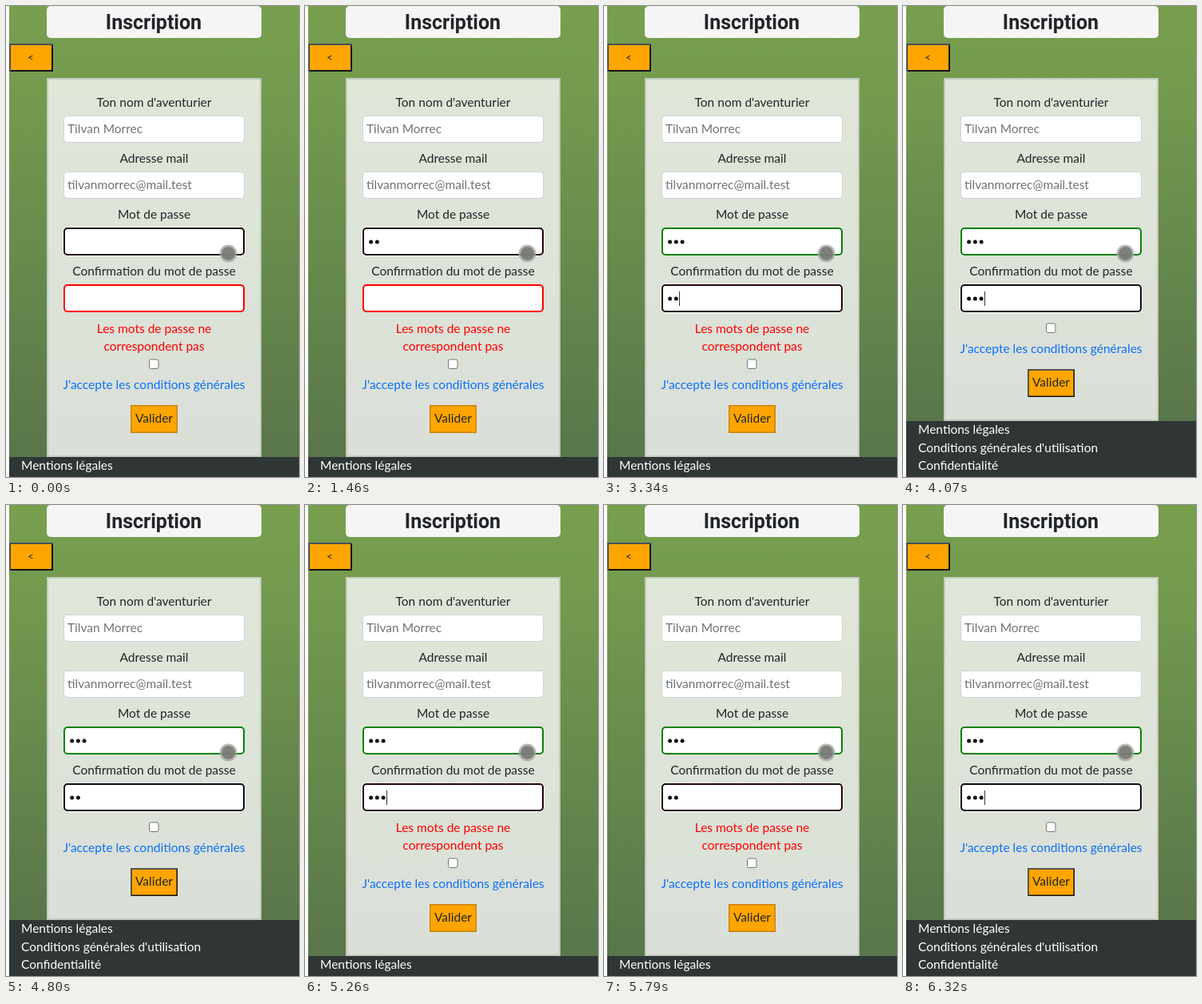
Recreate the animation shown at these times as an HTML page. Size 367 by 589 pixels, loop 6.72 s.

```html
<!DOCTYPE html>
<html lang="fr">
<head>
<meta charset="utf-8">
<title>Inscription</title>
<style>
  html, body { margin: 0; width: 100%; height: 100%; overflow: hidden; background: #fff; }
  svg { display: block; width: 367px; height: 589px; }
  text { font: 15.5px Lato, sans-serif; fill: #212529; }
  .mid { text-anchor: middle; }
  .title { font: 700 25px Roboto, sans-serif; }
  .hint { fill: #6f7377; }
  .error { fill: #f00; }
  .link { fill: #0d6efd; }
  .foot { fill: #fff; }
  .box { fill: #fff; stroke: #ced4da; }
  .button { fill: #ffa500; stroke: #111; }
  .bevel { fill: none; stroke: #4b5157; }
</style>
</head>
<body>
<svg viewBox="0 0 367 589">
  <defs>
    <linearGradient id="grass" x2="0" y2="1">
      <stop offset="0" stop-color="#789f4e"/>
      <stop offset=".2" stop-color="#749a4e"/>
      <stop offset="1" stop-color="#59764b"/>
    </linearGradient>
  </defs>
  <rect id="back" x="4" width="363" height="564" fill="url(#grass)"/>
  <rect x="51" width="269" height="40" rx="5" fill="#f5f5f5"/>
  <text class="mid title" x="185" y="29">Inscription</text>

  <rect class="button" x="5" y="48" width="53" height="33" stroke-width="2"/>
  <path class="bevel" d="M5 82V48H59" stroke-width="2"/>
  <text class="mid" x="31" y="69" style="font-size:13.5px">&lt;</text>

  <rect id="card" x="52" y="91" width="267" height="472" fill="#fafafc" fill-opacity=".8" stroke="#c3cabf" stroke-width="2"/>
  <g id="form"></g>
  <g id="error"></g>
  <g id="lower">
    <rect x="179.5" y="442" width="11.5" height="11.5" rx="2" fill="#fff" stroke="#767676"/>
    <rect id="button" class="button" x="156.75" y="499.75" width="57.5" height="33.5" stroke-width="1.5"/>
    <path id="bevel" class="bevel" d="M156.75 534V499.75H215" stroke-width="1.5"/>
    <rect x="4" y="564" width="363" height="80" fill="#2f3635"/>
  </g>
  <g fill-opacity=".8">
    <circle cx="278.5" cy="309.5" r="11" fill="#a5a7a2"/>
    <circle cx="278.5" cy="309.5" r="8.5" fill="#70726e"/>
  </g>
</svg>
<script>
const LOOP = 6720;
const PITCH = 7.75;
const $ = id => document.getElementById(id);

function add(parent, tag, attrs) {
  const el = document.createElementNS('http://www.w3.org/2000/svg', tag);
  for (const key in attrs) el.setAttribute(key, attrs[key]);
  return parent.appendChild(el);
}

function write(parent, style, y, text) {
  const x = style === 'hint' ? 77 : style === 'foot' ? 19 : 185.5;
  add(parent, 'text', { class: style, x, y }).textContent = text;
}

const show = (el, on) => el.setAttribute('visibility', on ? 'visible' : 'hidden');

function makeField(y) {
  const form = $('form');
  const halo = add(form, 'rect', { x: 71.5, y: y - .5, width: 228, height: 36, rx: 6, fill: 'none', stroke: '#fff' });
  const frame = add(form, 'rect', { x: 73, y: y + 1, width: 225, height: 33, rx: 4, fill: '#fff', 'stroke-width': 2 });
  const dots = [0, 1, 2].map(i =>
    add(form, 'circle', { cx: 82.6 + i * PITCH, cy: y + 18, r: 2.5, fill: '#111' }));
  const caret = add(form, 'rect', { y: y + 9, width: 1, height: 18, fill: '#333' });
  return (count, focus, valid, blink) => {
    const plain = valid ? '#0a800a' : '#f00';
    const dark = valid ? '#0c0c0c' : '#1e0505';
    frame.setAttribute('stroke', focus ? dark : plain);
    show(halo, focus);
    dots.forEach((dot, i) => show(dot, i < count));
    caret.setAttribute('x', Math.round(78.6 + count * PITCH));
    show(caret, focus && blink);
  };
}

['Ton nom d\'aventurier', 'Adresse mail', 'Mot de passe'].forEach((label, i) =>
  write($('form'), 'mid', 126 + 70 * i, label));
['Tilvan Morrec', 'tilvanmorrec@mail.test'].forEach((hint, i) => {
  add($('form'), 'rect', { class: 'box', x: 72.5, y: 137.5 + 70 * i, width: 226, height: 33, rx: 4.5 });
  write($('form'), 'hint', 159 + 70 * i, hint);
});
write($('form'), 'mid', 337, 'Confirmation du mot de passe');
write($('error'), 'mid error', 409, 'Les mots de passe ne');
write($('error'), 'mid error', 431, 'correspondent pas');
write($('lower'), 'mid link', 479, 'J\'accepte les conditions générales');
write($('lower'), 'mid', 521, 'Valider');
['Mentions légales', 'Conditions générales d\'utilisation', 'Confidentialité'].forEach((line, i) =>
  write($('lower'), 'foot', 580 + 22.5 * i, line));

const fields = [makeField(277), makeField(348)];

const actions = {
  blink(s) { s.caret = !s.caret; },
  type(s) { s.counts[s.focus]++; s.caret = true; },
  erase(s) { s.counts[s.focus]--; },
  accept(s) { s.valid[0] = true; },
  next(s) { s.focus = 1; s.caret = true; },
  check(s) { s.valid[1] = s.counts[0] === s.counts[1]; }
};

const events = [
  [70, 'blink'], [600, 'type'], [930, 'type'], [1460, 'blink'],
  [1530, 'type'], [1590, 'accept'], [2060, 'next'], [2590, 'blink'],
  [2930, 'type'], [3340, 'type'], [3870, 'blink'], [4010, 'type'],
  [4070, 'check'], [4530, 'blink'], [4800, 'erase'], [4860, 'check'],
  [5060, 'blink'], [5260, 'type'], [5330, 'check'], [5660, 'erase'],
  [5660, 'check'], [5790, 'blink'], [6250, 'type'], [6320, 'check']
];

function stateAt(t) {
  const state = { counts: [0, 0], focus: 0, caret: false, valid: [false, false] };
  for (const [time, name] of events) if (time <= t) actions[name](state);
  return state;
}

function draw({ counts, focus, caret, valid }) {
  const match = valid[1];
  const lift = match ? 45 : 0;
  fields.forEach((field, i) => field(counts[i], focus === i, valid[i], caret));
  show($('error'), !match);
  show($('bevel'), match);
  $('lower').setAttribute('transform', `translate(0 ${-lift})`);
  $('back').setAttribute('height', 564 - lift);
  $('card').setAttribute('height', 472 - lift);
  $('button').style.stroke = match ? '#111' : '#c9830f';
}

function tick() {
  draw(stateAt(performance.now() % LOOP));
  requestAnimationFrame(tick);
}
tick();
</script>
</body>
</html>
```
